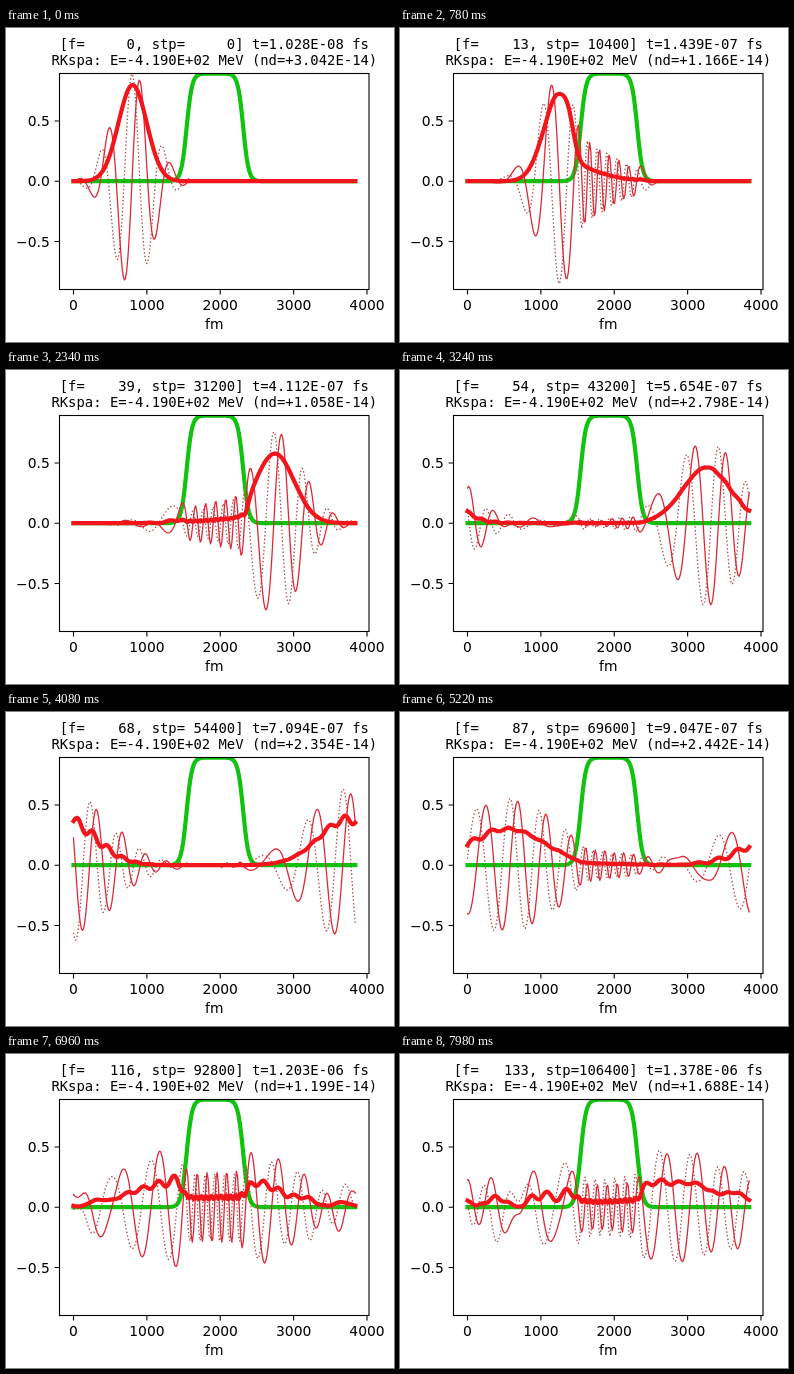
These frames come from a looping animation (388x314 px, 8 s). An HTML page with a canvas:

```html
<!DOCTYPE html>
<html lang="en">
<head>
<meta charset="utf-8">
<title>Wave packet crossing a potential step</title>
<style>
html, body { margin: 0; width: 100%; height: 100%; overflow: hidden; background: #fff; }
canvas { display: block; }
</style>
</head>
<body>
<canvas id="stage" width="388" height="314"></canvas>
<script>
const ctx = document.getElementById('stage').getContext('2d');

// Physics, with lengths in units of UNIT_FM on a periodic grid
const UNIT_FM = 385.52, N = 250, DX = 0.04;
const FRAMES = 134, FRAME_MS = 60, LOOP_MS = 8000;
const FRAME_TIME = 0.008, SUBSTEPS = 80, DT = FRAME_TIME / SUBSTEPS;
const FRAME_FS = 1.02805e-8;
const K0 = 1.8 * Math.PI, START = 2, PHASE_START = 2.02;
const PEAK = Math.pow(2 / Math.PI, 0.25);
const DEPTH = 280, EDGE = 0.095;

const grid = Array.from({ length: N }, (_, j) => j * DX);
const smoothStep = d => 1 / (1 + Math.exp(-d / EDGE));
const profile = grid.map(x => smoothStep(x - 4) * smoothStep(6 - x));

// One half of a leapfrog step: target += dt * H(source)
function kick(target, source, dt) {
  for (let j = 0; j < N; j++) {
    const left = source[(j + N - 1) % N], right = source[(j + 1) % N];
    const bend = (left - 2 * source[j] + right) / (DX * DX);
    target[j] -= dt * (bend + DEPTH * profile[j] * source[j]);
  }
}

function simulate() {
  const envelope = x => PEAK * Math.exp(-((x - START) ** 2));
  const re = Float64Array.from(grid, x => envelope(x) * Math.cos(K0 * (x - PHASE_START)));
  const im = Float64Array.from(grid, x => envelope(x) * Math.sin(K0 * (x - PHASE_START)));
  const states = [];
  for (let f = 0; f < FRAMES; f++) {
    for (let s = 0; s < SUBSTEPS; s++) {
      kick(re, im, DT);
      kick(im, re, -DT);
    }
    states.push({ re: re.slice(), im: im.slice(), density: re.map((r, j) => r * r + im[j] * im[j]) });
  }
  return states;
}

// Plot geometry
const LEFT = 53.5, RIGHT = 363, TOP = 45.5, BOTTOM = 261.5;
const px = fm => 67.5 + fm * 0.073375;
const py = v => 153.2 - v * 120.5;
const SANS = '13.89px "DejaVu Sans", sans-serif';
const MONO = '13.89px "DejaVu Sans Mono", monospace';

function curve(values, color, width, dash = [], cap = 'square') {
  ctx.strokeStyle = color;
  ctx.lineWidth = width;
  ctx.lineCap = cap;
  ctx.lineJoin = 'round';
  ctx.setLineDash(dash);
  ctx.beginPath();
  values.forEach((v, j) => ctx.lineTo(px(grid[j] * UNIT_FM), py(v)));
  ctx.stroke();
  ctx.setLineDash([]);
}

function text(str, x, y, font, align = 'center') {
  ctx.font = font;
  ctx.textAlign = align;
  ctx.fillText(str, x, y);
}

function drawAxes() {
  ctx.strokeStyle = ctx.fillStyle = '#000';
  ctx.lineWidth = 1.1;
  ctx.lineCap = 'butt';
  ctx.lineJoin = 'miter';
  ctx.strokeRect(LEFT, TOP, RIGHT - LEFT, BOTTOM - TOP);
  ctx.beginPath();
  for (let fm = 0; fm <= 4000; fm += 1000) {
    ctx.moveTo(px(fm), BOTTOM);
    ctx.lineTo(px(fm), BOTTOM + 4.9);
    text(fm, px(fm), 282, SANS);
  }
  for (const v of [-0.5, 0, 0.5]) {
    ctx.moveTo(LEFT, py(v));
    ctx.lineTo(LEFT - 4.9, py(v));
    text(v.toFixed(1).replace('-', '\u2212'), 43.8, py(v) + 5.1, SANS, 'right');
  }
  ctx.stroke();
  text('fm', 208.3, 300.6, SANS);
}

// Norm drift in units of 1e-14, as [frame, value]
const DRIFT = [[0, 3.042], [25, -0.5662], [54, 2.798], [68, 2.354], [87, 2.442], [116, 1.199], [133, 1.688]];

function driftAt(f) {
  const i = Math.max(1, DRIFT.findIndex(([key]) => key >= f));
  const [f0, a] = DRIFT[i - 1], [f1, b] = DRIFT[i];
  return (a + (b - a) * (f - f0) / (f1 - f0)) * 1e-14;
}

const scientific = v => v.toExponential(3).replace(/e([+-])(\d)$/, 'e$10$2').toUpperCase();
const padded = n => String(n).padStart(6);

function drawTitle(f) {
  const drift = driftAt(f);
  text(`[f=${padded(f)}, stp=${padded(f * 800)}] t=${scientific((f + 1) * FRAME_FS)} fs`, 208.3, 21, MONO);
  text(`RKspa: E=-4.190E+02 MeV (nd=${drift < 0 ? '' : '+'}${scientific(drift)})`, 208.3, 37.2, MONO);
}

const states = simulate();
const barrier = profile.map(v => v * PEAK);

function draw(now) {
  const f = Math.floor((now % LOOP_MS) / FRAME_MS);
  const { re, im, density } = states[f];
  ctx.fillStyle = '#fff';
  ctx.fillRect(0, 0, 388, 314);
  ctx.save();
  ctx.beginPath();
  ctx.rect(LEFT, TOP, RIGHT - LEFT, BOTTOM - TOP);
  ctx.clip();
  curve(barrier, '#0fc30f', 4.2);
  curve(im, '#dc2a38', 1.3);
  curve(re, '#b44444', 1.3, [1.4, 2.3], 'butt');
  curve(density, '#f2151c', 4.2);
  ctx.restore();
  drawAxes();
  drawTitle(f);
  requestAnimationFrame(draw);
}
draw(performance.now());
</script>
</body>
</html>
```
